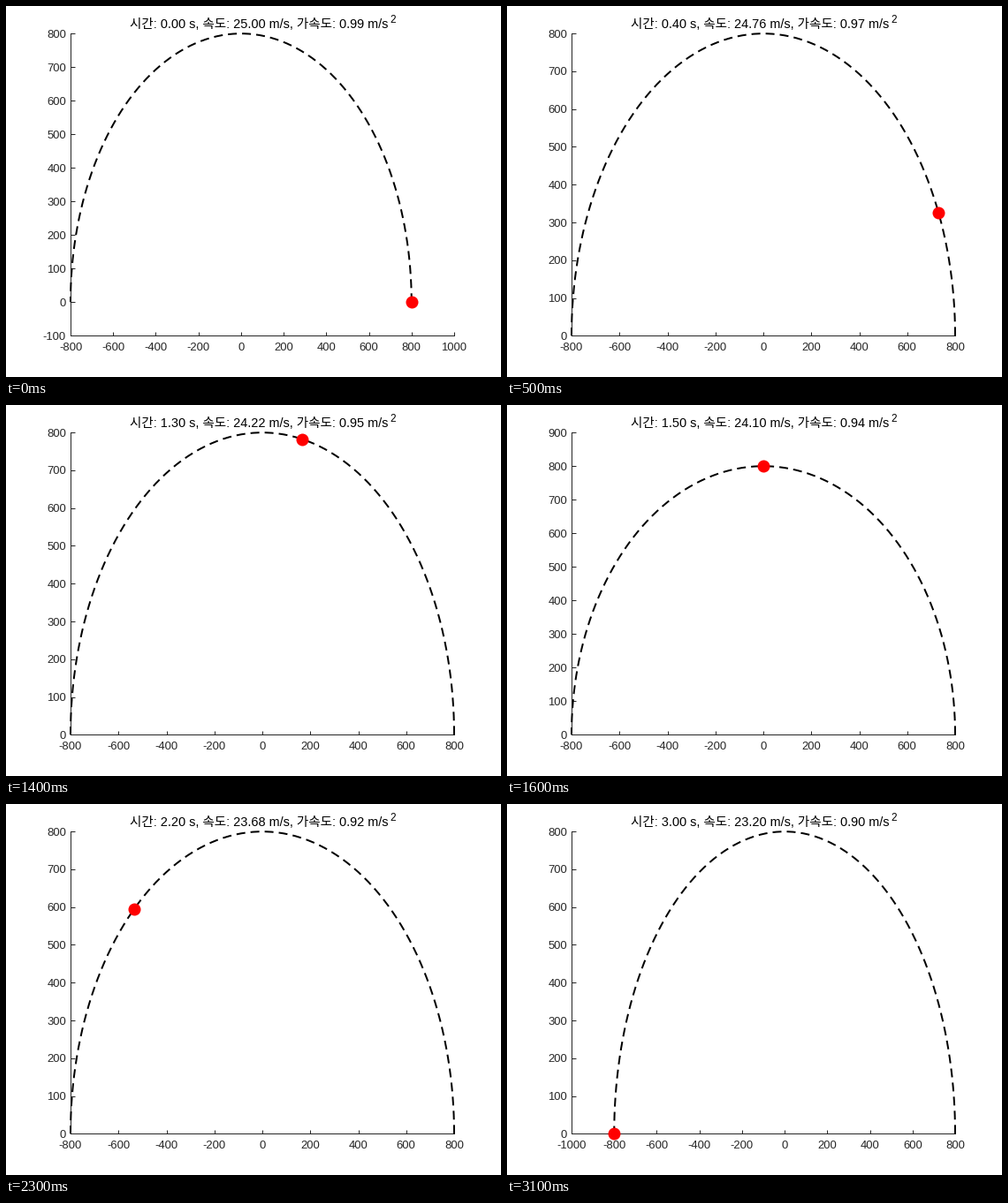
A matplotlib script for the animation above (3300 ms loop, 560 px wide and 420 px high).

```python
import numpy as np
import matplotlib.pyplot as plt
from matplotlib.animation import FuncAnimation
from matplotlib.ticker import FormatStrFormatter, MultipleLocator

W, H, DPI = 560, 420, 100
PT = 72 / DPI                      # points per pixel
LEFT, RIGHT, TOP, BOTTOM = 73, 507, 31.2, 373.3

INK = "#262626"

R = 800                            # radius, m
V0, DECEL = 25, 0.6                # start speed and braking
STEP, LAST = 0.1, 30               # seconds per step, last step

plt.rcParams["font.family"] = ["Liberation Sans", "Noto Sans CJK JP"]

fig = plt.figure(figsize=(W / DPI, H / DPI), dpi=DPI, facecolor="white")
ax = fig.add_axes([LEFT / W, 1 - BOTTOM / H,
                   (RIGHT - LEFT) / W, (BOTTOM - TOP) / H])
ax.patch.set_visible(False)
ax.spines[["top", "right"]].set_visible(False)
for side in ("left", "bottom"):
    ax.spines[side].set(color=INK, linewidth=PT)
ax.tick_params(direction="in", length=4.5 * PT, width=PT, color=INK,
               labelcolor=INK, labelsize=13 * PT)
ax.tick_params(axis="x", pad=8 * PT)
ax.tick_params(axis="y", pad=5 * PT)
for axis, gap in ((ax.xaxis, 200), (ax.yaxis, 100)):
    axis.set_major_locator(MultipleLocator(gap))
    axis.set_major_formatter(FormatStrFormatter("%d"))

arc = np.linspace(0, np.pi, 100)
ax.plot(R * np.cos(arc), R * np.sin(arc), color="black", linewidth=2 * PT,
        dashes=(5, 3), dash_capstyle="butt", clip_on=False, zorder=3)
car, = ax.plot([], [], "o", color="red", markersize=14 * PT,
               markeredgewidth=0, clip_on=False, zorder=4)

title = fig.text(139.5 / W, 1 - 25 / H, "", fontsize=14.5 * PT,
                 color="black", va="baseline")
fig.text(434 / W, 1 - 19 / H, "2", fontsize=11.6 * PT,
         color="black", va="baseline")


def limits(n):
    """An axis grows by one tick when the car touches its edge."""
    x_lim, y_lim = [-R, R], [0, R]
    if n == 0:
        x_lim[1], y_lim[0] = R + 200, -100
    elif n == LAST:
        x_lim[0] = -R - 200
    elif n == LAST // 2:
        y_lim[1] = R + 100
    return x_lim, y_lim


def update(k):
    n = min(k - (k > 3), LAST)     # the fourth and last steps hold twice
    t = n * STEP
    angle = np.pi * n / LAST
    v = V0 - DECEL * t
    a = np.hypot(DECEL, v ** 2 / R)
    x_lim, y_lim = limits(n)
    ax.set_xlim(x_lim)
    ax.set_ylim(y_lim)
    car.set_data([R * np.cos(angle)], [R * np.sin(angle)])
    title.set_text(f"시간: {t:.2f} s, 속도: {v:.2f} m/s, 가속도: {a:.2f} m/s")
    return car, title


anim = FuncAnimation(fig, update, frames=33, interval=100, repeat=True,
                     repeat_delay=0, blit=False)
plt.show()
```
